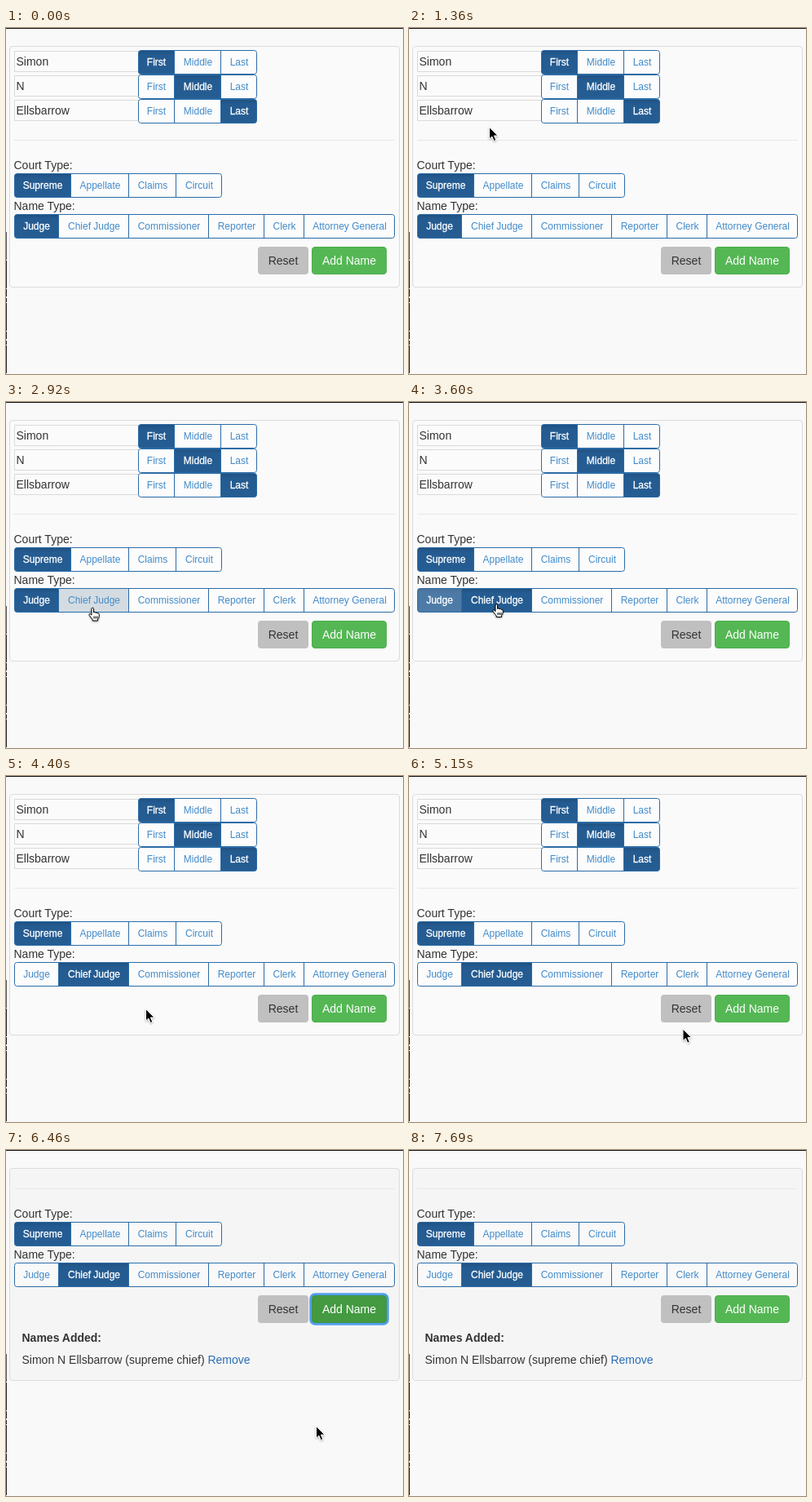
Animation, 487 px wide and 424 px high, one loop 7790 ms. Source, as an HTML page:

```html
<!DOCTYPE html>
<html lang="en">
<head>
<meta charset="utf-8">
<title>Name form</title>
<style>
html, body { margin: 0; width: 100%; height: 100%; overflow: hidden; background: #f9f9f9; }
svg { display: block; font: 14px "Liberation Sans", Arial, sans-serif; fill: #333; }
.small { font-size: 12px; text-anchor: middle; }
.mid { text-anchor: middle; }
</style>
</head>
<body>
<svg id="stage" width="487" height="424" viewBox="0 0 487 424">
  <defs>
    <linearGradient id="pressed" x1="0" y1="0" x2="0" y2="1">
      <stop offset="0" stop-color="#1f5080"/>
      <stop offset=".2" stop-color="#245b91"/>
      <stop offset="1" stop-color="#255d93"/>
    </linearGradient>
    <filter id="soft" x="-10%" y="-20%" width="120%" height="140%"><feGaussianBlur stdDeviation=".7"/></filter>
    <filter id="shadow" x="-40%" y="-40%" width="180%" height="180%">
      <feDropShadow dx="0" dy="1" stdDeviation="1" flood-opacity=".35"/>
    </filter>
  </defs>
  <path d="M0 .5H487" stroke="#111"/>
  <path d="M.5 250V284" stroke="#555"/>
  <path d="M.5 285V424" stroke="#222" stroke-dasharray="34 1 9 2 5 1"/>
  <rect id="panel" x="4.5" y="22.5" width="478" rx="3.5" stroke="#dcdcdc"/>
  <g id="inputs"></g>
  <g id="lower">
    <path d="M10 137.5H477" stroke="#e8e8e8"/>
    <text x="9.5" y="173">Court Type:</text>
    <text x="9.5" y="223">Name Type:</text>
    <g id="groups"></g>
    <rect x="309" y="268" width="62" height="34" rx="4" fill="#c0c0c0"/>
    <text class="mid" x="340" y="290">Reset</text>
    <rect id="glow" x="374" y="267" width="94" height="36" rx="5" fill="none" stroke="#4f9fee" stroke-width="3.5" filter="url(#soft)"/>
    <rect id="add" x="375.5" y="268.5" width="91" height="33" rx="3.5" stroke="#4cae4c"/>
    <text class="mid" x="421" y="290" fill="#fff">Add Name</text>
  </g>
  <g id="added">
    <text x="19.5" y="235" font-weight="bold" textLength="auto">Names Added:</text>
    <text x="19.5" y="262">Simon N Ellsbarrow (supreme chief) <tspan fill="#2a6db5">Remove</tspan></text>
  </g>
  <g id="cursor" filter="url(#shadow)">
    <path id="arrow" d="M.5 .5V15L3.8 12 6.2 17.5 8.8 16.4 6.4 11H11Z" fill="#000" stroke="#fff"/>
    <path id="hand" transform="translate(-5 -1)" fill="#fff" stroke="#000" stroke-linejoin="round"
      d="M4 9V2Q4 .7 5.2 .7 6.5 .7 6.5 2V6.5Q8 5 9 6.8 10.5 5.8 11.3 7.5 13.3 6.8 13.3 9V11Q13 13.5 11.6 14.5V16.5H5.2V15Q3 12.5 1.2 9.8 .5 8.3 1.6 8 2.6 7.8 4 9.6ZM7 11V14M9 11V14M11 11V14"/>
    <path id="beam" d="M-3 -7.5Q0 -7.5 0 -5.5 0 -7.5 3 -7.5M0 -6V6M-3 7.5Q0 7.5 0 5.5 0 7.5 3 7.5" fill="none" stroke="#222"/>
  </g>
</svg>
<script>
const LOOP = 7790;
const BLUE = '#428bca', BORDER = '#2c6ca6';
const $ = id => document.getElementById(id);

function make(parent, tag, attrs, text = '') {
  const el = document.createElementNS('http://www.w3.org/2000/svg', tag);
  for (const key in attrs) el.setAttribute(key, attrs[key]);
  el.textContent = text;
  return parent.appendChild(el);
}

// Draws a joined button group; edges has one more entry than labels.
function buttonGroup(parent, y, edges, labels, active) {
  const left = edges[0], right = edges[edges.length - 1];
  const clip = 'clip' + y;
  const frame = { x: left + .5, y: y + .5, width: right - left - 1, height: 29, rx: 3 };
  make(make(parent, 'clipPath', { id: clip }), 'rect', frame);
  make(parent, 'rect', { ...frame, fill: '#fff', 'fill-opacity': .4 });
  const buttons = labels.map((label, i) => {
    const x = edges[i], width = edges[i + 1] - x;
    const box = { x, y, width, height: 30, 'clip-path': `url(#${clip})` };
    const hover = make(parent, 'rect', { ...box, fill: '#d4dce2', opacity: 0 });
    const fill = make(parent, 'rect', { ...box, fill: 'url(#pressed)' });
    if (i) make(parent, 'path', { d: `M${x - .5} ${y}v30`, stroke: BORDER });
    const text = make(parent, 'text', { class: 'small', x: x + width / 2, y: y + 19 }, label);
    const button = {
      set(on, hovered = 0) {
        fill.setAttribute('opacity', on);
        hover.setAttribute('opacity', hovered);
        text.setAttribute('fill', on > .5 ? '#fff' : BLUE);
        text.setAttribute('stroke', on > .5 ? '#fff' : 'none');
        text.setAttribute('stroke-width', .3);
      }
    };
    button.set(i === active ? 1 : 0);
    return button;
  });
  make(parent, 'rect', { ...frame, fill: 'none', stroke: BORDER });
  return buttons;
}

['Simon', 'N', 'Ellsbarrow'].forEach((name, i) => {
  const y = 27 + 30 * i;
  make($('inputs'), 'rect', { x: 10.5, y: y + 1.5, width: 152, height: 25, fill: '#fbfbfb', stroke: '#dadada' });
  make($('inputs'), 'text', { x: 12.5, y: y + 19 }, name);
  buttonGroup($('inputs'), y, [162, 207, 264, 308], ['First', 'Middle', 'Last'], i);
});
buttonGroup($('groups'), 178, [10, 80, 151, 209, 265], ['Supreme', 'Appellate', 'Claims', 'Circuit'], 0);
const [judge, chief] = buttonGroup($('groups'), 228, [10, 65, 151, 249, 317, 366, 477],
  ['Judge', 'Chief Judge', 'Commissioner', 'Reporter', 'Clerk', 'Attorney General'], 0);

// Pointer hotspot: time, x, y
const route = [
  [300, 84, -20], [880, 98, 127], [1310, 98, 127], [1360, 98, 121], [1680, 87, 54],
  [2100, 104, 147], [2149, 104, 147], [2150, 105, 160], [2520, 105, 160],
  [2860, 106, 253], [2980, 106, 252], [3320, 107, 248], [3750, 107, 248],
  [4340, 168, 284], [4399, 168, 284], [4400, 171, 285], [4590, 171, 285],
  [4980, 290, 321], [5380, 406, 292], [5559, 406, 292], [5560, 410, 290],
  [6230, 410, 290], [6460, 380, 338], [6890, 380, 338], [7340, 440, 430]
];

const ramp = (t, from, to) => Math.min(1, Math.max(0, (t - from) / (to - from)));
const within = (x, y, l, t, r, b) => x >= l && x <= r && y >= t && y <= b;
const show = (id, on) => $(id).setAttribute('visibility', on ? 'visible' : 'hidden');

function pointerAt(t) {
  const i = route.findIndex(key => key[0] > t);
  if (i < 1) return route[i ? route.length - 1 : 0].slice(1);
  const [t0, x0, y0] = route[i - 1], [t1, x1, y1] = route[i];
  const k = ramp(t, t0, t1), e = k * k * (3 - 2 * k);
  return [x0 + (x1 - x0) * e, y0 + (y1 - y0) * e];
}

function drawPointer(t) {
  const [x, y] = pointerAt(t);
  const beam = t < 5980 && within(x, y, 10, 28, 162, 113);
  const hand = t < 5980 && (within(x, y, 10, 178, 265, 208) || within(x, y, 10, 228, 477, 258));
  $('cursor').setAttribute('transform', `translate(${x.toFixed(1)} ${y.toFixed(1)})`);
  show('cursor', t >= 350 && t < 7340);
  $('beam').style.display = beam ? '' : 'none';
  $('hand').style.display = hand ? '' : 'none';
  $('arrow').style.display = beam || hand ? 'none' : '';
}

function render(t) {
  const chosen = t >= 3600, submitted = t >= 5980;
  judge.set(chosen ? 1 - ramp(t, 3555, 3800) : 1);
  chief.set(chosen ? 1 : 0, chosen ? 0 : ramp(t, 2740, 2900));

  $('inputs').style.display = submitted ? 'none' : '';
  $('added').style.display = submitted ? '' : 'none';
  $('lower').setAttribute('transform', `translate(0 ${submitted ? -90 : 0})`);
  $('panel').setAttribute('height', submitted ? 260 : 295);
  $('panel').setAttribute('fill', submitted ? '#f5f5f5' : '#fafafa');

  const dark = t < 7690 ? ramp(t, 5240, 5380) : 0;
  const mix = (a, b) => Math.round(a + (b - a) * dark);
  $('add').setAttribute('fill', `rgb(${mix(84, 67)},${mix(183, 154)},${mix(84, 65)})`);
  $('add').setAttribute('stroke', dark ? '#3f933f' : '#4cae4c');
  show('glow', t >= 5740 && t < 7690);
  drawPointer(t);
}

const start = performance.now();
function tick() {
  render((performance.now() - start) % LOOP);
  requestAnimationFrame(tick);
}
tick();
</script>
</body>
</html>
```
